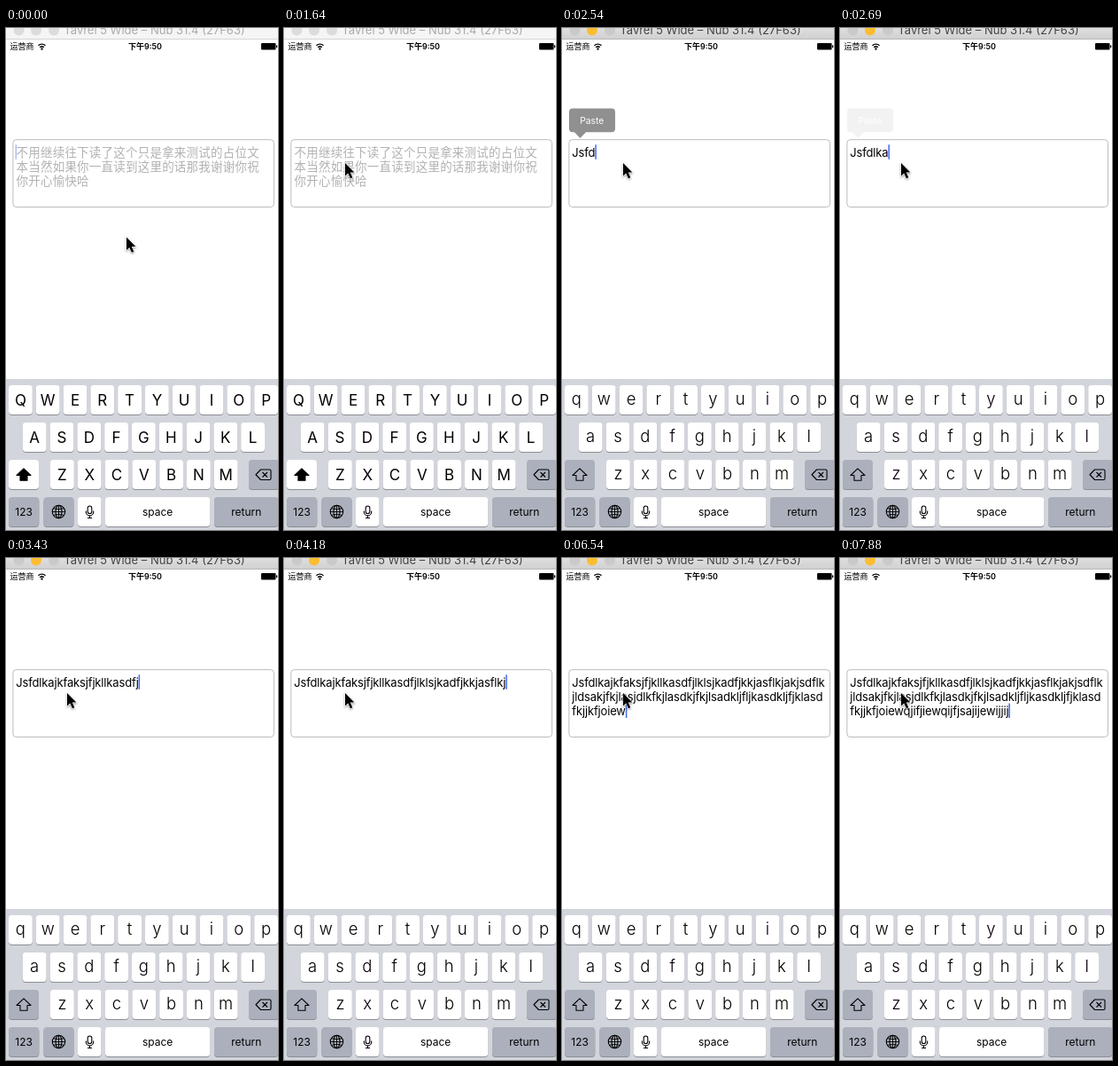
An HTML page for the animation above (8 s loop, 307 by 565 pixels).

```html
<!DOCTYPE html>
<html lang="zh-CN">
<head>
<meta charset="utf-8">
<style>
html, body { margin: 0; height: 100%; overflow: hidden; background: #fff; }
svg { display: block; width: 100vw; height: 100vh; }
text { font-family: Inter, Roboto, sans-serif; white-space: pre; }
.cjk { font-family: "Noto Sans CJK SC", "Noto Sans CJK", sans-serif; }
.mid text, text.mid { text-anchor: middle; }
.hint { font-size: 13.5px; letter-spacing: .22px; fill: #b2b2b4; }
.typed { font-size: 13px; letter-spacing: -.155px; }
.line { fill: none; stroke: #000; }
</style>
</head>
<body>
<svg viewBox="0 0 307 565">
  <defs>
    <linearGradient id="bar" x2="0" y2="1">
      <stop stop-color="#dedede"/><stop offset="1" stop-color="#d1d1d1"/>
    </linearGradient>
  </defs>
  <rect width="307" height="565" fill="#fff"/>

  <rect id="titlebar" width="307" height="12"/>
  <path id="barEdge" d="M0 12.5H307"/>
  <g id="lights"></g>
  <text id="title" class="mid" x="167.5" y="7" font-size="13">Tavrel 5 Wide – Nub 31.4 (27F63)</text>

  <text class="cjk" x="4.5" y="24" font-size="9">运营商</text>
  <g class="line" stroke-width="1.4">
    <path d="M36.5 19.8a5.7 5.7 0 0 1 8 0M38.2 21.8a3.3 3.3 0 0 1 4.6 0"/>
    <circle cx="40.5" cy="23.5" r=".5"/>
  </g>
  <text class="cjk mid" x="157" y="24" font-size="9" font-weight="700">下午<tspan font-family="Inter, sans-serif" font-weight="600">9:50</tspan></text>
  <rect x="288" y="17" width="16.5" height="7.5" rx="1"/>
  <rect x="305" y="19.3" width="1.2" height="3" rx=".5"/>

  <rect x="7.9" y="125.7" width="294.5" height="75.8" rx="3.7" fill="#fff" stroke="#b3b5b8" stroke-width=".9"/>
  <g id="hint"></g>
  <g id="typed"></g>
  <rect id="caret" width="1.5" height="16.5" fill="#426bf2"/>

  <g id="menu">
    <path d="M12 90.5H56a4 4 0 0 1 4 4V113.300a4 4 0 0 1-4 4H27L20.500 124L14 117.300H12a4 4 0 0 1-4-4V94.500a4 4 0 0 1 4-4Z" fill="#232323"/>
    <text class="mid" x="33.700" y="107.700" font-size="10.300" fill="#fff">Paste</text>
  </g>

  <rect y="395" width="307" height="170" fill="#d2d5db"/>
  <g id="keys" class="mid"></g>
  <path id="shift" d="M20 495.800L28 503.500H24V509.300H16V503.500H12Z" stroke="#000" stroke-width="1.100" stroke-linejoin="round"/>
  <g class="line" stroke-width="1.100">
    <path d="M287.500 497H297.500a1.500 1.500 0 0 1 1.500 1.500V507a1.500 1.500 0 0 1-1.500 1.500H287.500L282 502.750ZM289.500 500l5.500 5.500M295 500l-5.500 5.500" stroke-linejoin="round"/>
    <circle cx="59.500" cy="544.500" r="7.200"/>
    <ellipse cx="59.500" cy="544.500" rx="3.500" ry="7.200"/>
    <path d="M59.500 537.300V551.700M52.300 544.500H66.700M53.600 540.600Q59.500 543 65.400 540.600M53.600 548.400Q59.500 546 65.400 548.400" stroke-width=".9"/>
    <rect x="92.200" y="538" width="4.600" height="8.500" rx="2.300"/>
    <path d="M90.300 543.500v1.200a4.200 4.200 0 0 0 8.400 0v-1.200M94.500 549v2.500M92 551.500h5"/>
  </g>

  <path id="pointer" d="M0 0V14.600L3.300 11.500L5.900 17.300L8.300 16.200L5.800 10.600H10.400Z" stroke="#fff" stroke-width="1.200" paint-order="stroke" style="filter:drop-shadow(0 1px .8px #0006)"/>
</svg>

<script>
const LOOP = 8000, STEP = 148.6;
const $ = id => document.getElementById(id);

function add(parent, tag, attrs, text = '') {
  const el = document.createElementNS('http://www.w3.org/2000/svg', tag);
  for (const name in attrs) el.setAttribute(name, attrs[name]);
  el.textContent = text;
  return parent.appendChild(el);
}

// Each track is a list of [step, value] points.
function lerp(track, step) {
  const i = track.findIndex(p => p[0] >= step);
  if (i < 0) return track[track.length - 1][1];
  if (i === 0) return track[0][1];
  const [s0, v0] = track[i - 1], [s1, v1] = track[i];
  return v0 + (v1 - v0) * (step - s0) / (s1 - s0);
}

const lineY = i => 144.5 + 16.1 * i;
const hints = ['不用继续往下读了这个只是拿来测试的占位文', '本当然如果你一直读到这里的话那我谢谢你祝', '你开心愉快哈'];
hints.forEach((s, i) => add($('hint'), 'text', { class: 'cjk hint', x: 11.5, y: lineY(i) }, s));

const lines = [
  'Jsfdlkajkfaksjfjkllkasdfjlklsjkadfjkkjasflkjakjsdflk',
  'jldsakjfkjlasjdlkfkjlasdkjfkjlsadkljfljkasdkljfjklasd',
  'fkjjkfjoiewqjifjiewqijfjsajijewijjij'
];
const rows = lines.map((_, i) => add($('typed'), 'text', { class: 'typed', x: 11.3, y: lineY(i) }));
const lights = [14.5, 34, 54].map(cx => add($('lights'), 'circle', { cx, cy: 2.5, r: 6 }));

function key(x, y, w, label, size, dark) {
  const box = { x, y: y + 1, width: w, height: 33, rx: 3.7, fill: '#8b8e94' };
  add($('keys'), 'rect', box);
  const face = add($('keys'), 'rect', { ...box, y, fill: dark ? '#abb0bc' : '#fff' });
  const text = add($('keys'), 'text', { x: x + w / 2, y: y + 16.5 + size * .36, 'font-size': size }, label);
  return { face, text };
}

const letters = [];
[['QWERTYUIOP', 3], ['ASDFGHJKL', 18.800], ['ZXCVBNM', 50]].forEach(([row, x0], r) =>
  [...row].forEach((c, i) => letters.push({ c, y: 402 + 42 * r, ...key(x0 + 30.8 * i, 402 + 42 * r, 26.800, c, 17) })));
const shiftKey = key(3, 486, 34, '', 12).face;
key(274, 486, 34.500, '', 12, true);
key(3, 528, 34.300, '123', 12, true);
key(42.500, 528, 34, '', 12, true);
key(81, 528, 26.500, '', 12);
key(112, 528, 118.300, 'space', 12);
key(235, 528, 72.500, 'return', 12, true);

const pointerX = [[0, 136], [1, 132], [3, 108], [5, 83], [7, 72], [8, 72], [10, 69]];
const pointerY = [[0, 235.5], [1, 230], [3, 198], [5, 164], [7, 151], [8, 151], [10, 152]];
const typing = [[16, 0], [18, 7], [20, 13], [28, 44], [36, 79], [44, 116], [53, 141]];
const blink = [.45, 0, 0, .5, 1, 1, .45, 0, 0, 1, .45, 0, 0, 0, 0, 1, 0];
const menuFade = { 14: 1, 15: 1, 16: 1, 17: .5, 18: .05 };

function setCase(upper) {
  for (const { c, y, text } of letters) {
    const size = upper ? 17 : 18.5;
    text.textContent = upper ? c : c.toLowerCase();
    text.setAttribute('font-size', size);
    text.setAttribute('font-weight', upper ? 400 : 300);
    text.setAttribute('y', y + (upper ? 22.700 : 21.500));
  }
  shiftKey.setAttribute('fill', upper ? '#fff' : '#abb0bc');
  $('shift').setAttribute('fill', upper ? '#000' : 'none');
}

function draw(step) {
  const active = step >= 12;
  $('titlebar').setAttribute('fill', active ? 'url(#bar)' : '#f5f5f5');
  $('barEdge').setAttribute('stroke', active ? '#b8b8b8' : '#d6d6d6');
  $('title').setAttribute('fill', active ? '#444' : '#aaa');
  lights.forEach((el, i) => el.setAttribute('fill', !active ? '#dcdcdc' : i === 1 ? '#fdbd30' : '#cacaca'));

  $('pointer').setAttribute('transform', `translate(${lerp(pointerX, step)} ${lerp(pointerY, step)})`);
  $('menu').setAttribute('opacity', menuFade[step] || 0);

  const count = Math.round(lerp(typing, step));
  $('hint').setAttribute('opacity', count ? 0 : 1);
  setCase(!count);
  let left = count, last = 0;
  lines.forEach((s, i) => {
    rows[i].textContent = s.slice(0, Math.max(0, left));
    if (left > 0) last = i;
    left -= s.length;
  });
  $('caret').setAttribute('x', count ? 11.3 + rows[last].getComputedTextLength() : 10.5);
  $('caret').setAttribute('y', 131.3 + 16.1 * last);
  $('caret').setAttribute('opacity', count ? 1 : blink[step]);
}

const start = performance.now();
let shown = -1;
function tick() {
  const step = Math.floor((performance.now() - start) % LOOP / STEP);
  if (step !== shown) draw(shown = step);
  requestAnimationFrame(tick);
}
tick();
</script>
</body>
</html>
```
